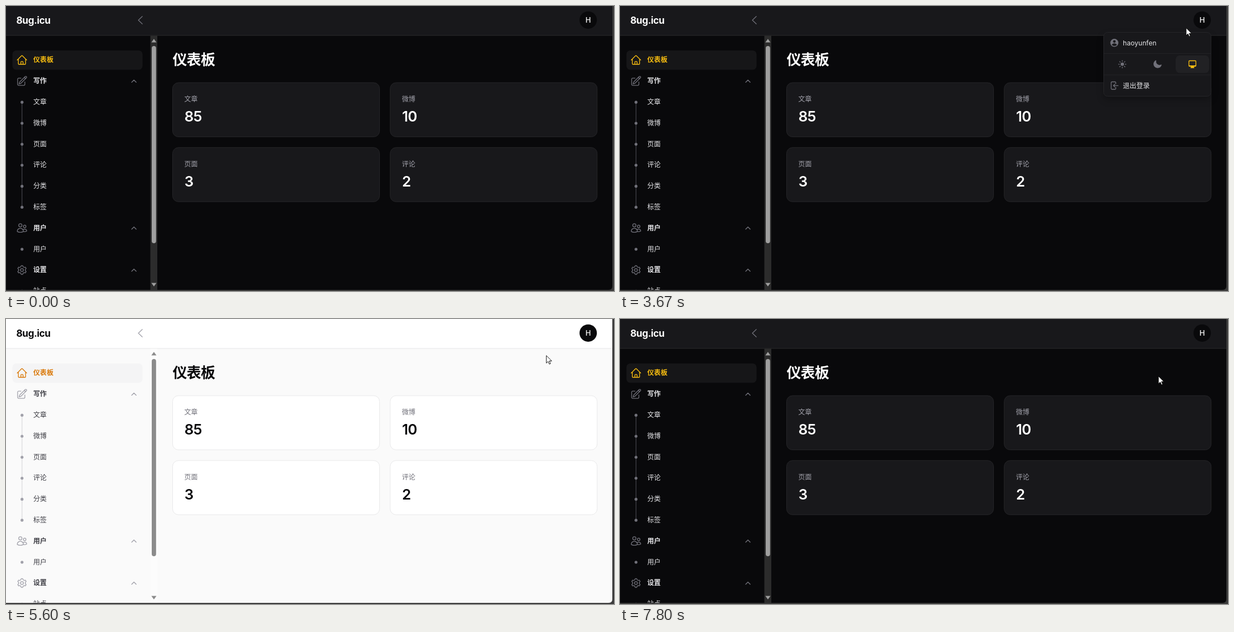
Recreate the animation shown at these times as an HTML page. Size 1093 px wide and 513 px high, loop 8 s.

```html
<!DOCTYPE html>
<html lang="zh-CN">
<head>
<meta charset="utf-8">
<title>仪表板</title>
<style>
html, body { margin: 0; width: 100%; height: 100%; overflow: hidden; background: #3b3b3b; }
svg { display: block; width: 1093px; height: 513px; font: 12.1px Inter, "Noto Sans CJK SC", sans-serif; }
#app {
  --page: #09090b; --panel: #18181b; --line: #2a2a2c; --ring: #252528; --rule: #232326;
  --strong: #fff; --text: #e4e4e7; --label: #a1a1aa; --icon: #71717a; --hover-icon: #a1a1aa;
  --thread: #52525b; --active: #161618; --accent: #fbbf10; --theme-accent: #fbbf10;
  --track: #2c2c2c; --thumb: #9f9f9f; --pick: #212124; --tip: #333; --tip-text: #fff;
  --old-icon: var(--icon); --shadow: rgba(0,0,0,.25); --tip-shadow: transparent;
}
#app.light {
  --page: #fafafa; --panel: #fff; --line: #e6e6e8; --ring: #e9e9ea; --rule: #f2f2f3;
  --strong: #09090b; --text: #3f3f46; --label: #71717a; --icon: #a1a1aa; --hover-icon: #71717a;
  --thread: #d4d4d8; --active: #f4f4f5; --accent: #d97706; --theme-accent: #e8a008;
  --track: #fcfcfc; --thumb: #8b8b8b; --pick: #fafafa; --tip: #fff; --tip-text: #26323d;
  --shadow: rgba(0,0,0,.16); --tip-shadow: rgba(120,128,145,.25);
}
#menu.fade {
  --panel: #757575; --rule: #2a2a2c; --ring: #666; --text: #b5b5b5; --icon: #8e8e92;
  --pick: #1f1f21; --old-icon: #b8924c;
}
.light #menu.fade {
  --panel: #969696; --rule: #ececec; --ring: #969696; --text: #5e5e5e; --icon: #a9a9b0;
  --pick: #f3f3f3; --theme-accent: #e8a63a; --old-icon: #d0b184;
}
text { fill: var(--text); white-space: pre; }
.strong { fill: var(--strong); }
.label { fill: var(--label); }
.line { fill: none; stroke: var(--icon); stroke-linecap: round; stroke-linejoin: round; }
.solid { fill: var(--icon); }
.panel { fill: var(--panel); stroke: var(--ring); }
#menu > .panel { filter: drop-shadow(0 6px 6px var(--shadow)); }
.choice { color: var(--icon); --bg: transparent; }
.choice.hover { color: var(--hover-icon); --bg: var(--pick); }
.choice.old { color: var(--old-icon); }
.choice.on { color: var(--theme-accent); --bg: var(--pick); }
#tip > g { fill: var(--tip); filter: drop-shadow(0 0 8px var(--tip-shadow)); }
#tip text { fill: var(--tip-text); }
.cursor { fill: #fff; stroke: #000; stroke-linejoin: round; }
</style>
</head>
<body>
<svg viewBox="0 0 1093 513">
  <clipPath id="edge"><path d="M0 0H1090V504Q1090 511 1083 511H0Z"/></clipPath>
  <g id="app"></g>
</svg>
<script>
const $ = id => document.getElementById(id);
const app = $('app');

// Text is placed by its left edge and the middle of its line.
const text = (x, mid, s, size = 12.1, attrs = '') =>
  `<text x="${x}" y="${mid + size * .37}" font-size="${size}" ${attrs}>${s}</text>`;
const rect = (x, y, w, h, r, attrs) =>
  `<rect x="${x}" y="${y}" width="${w}" height="${h}" rx="${r}" ${attrs}/>`;
const path = (d, attrs = 'class="line"') => `<path d="${d}" ${attrs}/>`;

function cog() {
  const at = (r, deg) => {
    const a = deg * Math.PI / 180;
    return `${(12 + r * Math.sin(a)).toFixed(2)} ${(12 - r * Math.cos(a)).toFixed(2)}`;
  };
  let pts = [];
  for (let a = 0; a < 360; a += 60)
    pts.push(at(7, a - 20), at(9.2, a - 10), at(9.2, a + 10), at(7, a + 20));
  return `M${pts.join('L')}ZM15 12a3 3 0 1 1-6 0a3 3 0 0 1 6 0Z`;
}

const icons = {
  home: 'm2.25 12 8.954-8.955c.44-.439 1.152-.439 1.591 0L21.75 12M4.5 9.75v10.125c0 .621.504 1.125 1.125 1.125H9.75v-4.875c0-.621.504-1.125 1.125-1.125h2.25c.621 0 1.125.504 1.125 1.125V21h4.125c.621 0 1.125-.504 1.125-1.125V9.75M8.25 21h8.25',
  write: 'm16.862 4.487 1.687-1.688a1.875 1.875 0 1 1 2.652 2.652L10.582 16.07a4.5 4.5 0 0 1-1.897 1.13L6 18l.8-2.685a4.5 4.5 0 0 1 1.13-1.897l8.932-8.931Zm0 0L19.5 7.125M18 14v4.75A2.25 2.25 0 0 1 15.75 21H5.25A2.25 2.25 0 0 1 3 18.75V8.25A2.25 2.25 0 0 1 5.25 6H10',
  users: 'M15 19.128a9.38 9.38 0 0 0 2.625.372 9.337 9.337 0 0 0 4.121-.952 4.125 4.125 0 0 0-7.533-2.493M15 19.128v-.003c0-1.113-.285-2.16-.786-3.07M15 19.128v.106A12.318 12.318 0 0 1 8.624 21c-2.331 0-4.512-.645-6.374-1.766l-.001-.109a6.375 6.375 0 0 1 11.964-3.07M12 6.375a3.375 3.375 0 1 1-6.75 0 3.375 3.375 0 0 1 6.75 0Zm8.25 2.25a2.625 2.625 0 1 1-5.25 0 2.625 2.625 0 0 1 5.25 0Z',
  cog: cog(),
  moon: 'M7.455 2.004a.75.75 0 0 1 .26.77 7 7 0 0 0 9.958 7.967.75.75 0 0 1 1.067.853A8.5 8.5 0 1 1 6.647 1.921a.75.75 0 0 1 .808.083Z',
  screen: 'M2 4.25A2.25 2.25 0 0 1 4.25 2h11.5A2.25 2.25 0 0 1 18 4.25v8.5A2.25 2.25 0 0 1 15.75 15h-3.105a3.5 3.5 0 0 0 1.1 1.677A.75.75 0 0 1 13.26 18H6.74a.75.75 0 0 1-.484-1.323A3.5 3.5 0 0 0 7.355 15H4.25A2.25 2.25 0 0 1 2 12.75ZM3.5 4.25a.75.75 0 0 1 .75-.75h11.5a.75.75 0 0 1 .75.75v7.5a.75.75 0 0 1-.75.75H4.25a.75.75 0 0 1-.75-.75Z'
};

const nav = [
  ['仪表板', 'home'], ['写作', 'write'], ['文章'], ['微博'], ['页面'], ['评论'],
  ['分类'], ['标签'], ['用户', 'users'], ['用户'], ['设置', 'cog'], ['站点']
];

function navItem([name, icon], i) {
  const y = 97 + 37.8 * i;
  if (!icon)
    return `<circle cx="28.8" cy="${y + .6}" r="2.6" class="solid"/>` + text(49, y, name);
  const color = i ? '' : 'style="stroke:var(--accent)"';
  return path(icons[icon], `class="line" stroke-width="1.5" ${color} transform="translate(18.3 ${y - 10.2}) scale(.867)"`) +
    text(49, y, name, 12.1, `font-weight="700" ${i ? '' : 'style="fill:var(--accent)"'}`) +
    (i ? path(`M226 ${y + 2.4}l4-4 4 4`, 'class="line" stroke-width="1.4"') : '');
}

function card(name, count, i) {
  const x = 299.5 + i % 2 * 391.2, y = 138 + (i >> 1) * 116.8;
  return rect(x, y, 372, 97.5, 10.5, 'class="panel"') +
    text(x + 21, y + 29.5, name, 12.1, 'class="label"') +
    text(x + 21.3, y + 60.4, count, 26, 'class="strong" font-weight="600" letter-spacing="-.65"');
}

function choice(i, art) {
  const x = 873 + 63 * i;
  return `<g class="choice" fill="currentColor">${rect(x, 89, 60, 31.5, 7, 'style="fill:var(--bg)"')}
    <g transform="translate(${x + 30} 104.8) scale(.867)">${art}</g></g>`;
}

const rays = [...Array(8)].map((_, i) =>
  `<path d="M0-6v-1.7" stroke="currentColor" stroke-width="1.5" stroke-linecap="round" transform="rotate(${i * 45})"/>`).join('');

const page = `
  <rect width="1090" height="511" style="fill:var(--page)"/>
  <rect width="1090" height="53" style="fill:var(--panel)"/>
  <rect y="52.5" width="1090" height="1" style="fill:var(--line)"/>
  ${text(18.5, 25.5, '8ug.icu', 17.3, 'class="strong" font-weight="700" letter-spacing="-.43"')}
  ${path('M245 18.8l-7 6.7 7 6.7', 'class="line" stroke-width="1.3"')}
  <circle cx="1046.6" cy="25.3" r="15.6" fill="#09090b"/>
  ${text(1046.6, 25.3, 'H', 13, 'text-anchor="middle" style="fill:#fff" font-weight="500"')}
  ${rect(11.5, 80, 234, 34.7, 7, 'style="fill:var(--active)"')}
  <path d="M28.8 173V362" style="stroke:var(--thread)"/>
  ${nav.map(navItem).join('')}
  ${rect(259.5, 53.5, 12.5, 458, 0, 'style="fill:var(--track)"')}
  <g style="fill:var(--thumb)">${rect(262, 72, 7.8, 355, 3.9, '')}
    <path d="M261.3 65.5l4.6-6.2 4.6 6.2ZM261.3 498.5l4.6 6.2 4.6-6.2Z"/></g>
  ${text(299.5, 96.3, '仪表板', 26, 'class="strong" font-weight="700" letter-spacing="-.65"')}
  ${[['文章', 85], ['微博', 10], ['页面', 3], ['评论', 2]].map(([n, c], i) => card(n, c, i)).join('')}`;

const menu = `<g id="menu">
  ${rect(869.5, 47.5, 193, 115, 7, 'class="panel"')}
  <path d="M870 85.5H1062M870 124H1062" style="stroke:var(--rule)"/>
  <circle cx="888.7" cy="66.3" r="7.2" class="solid"/>
  <path d="M884 69.8a5.6 5.6 0 0 1 9.4 0a6 6 0 0 1-9.4 0Z" style="fill:var(--panel)"/>
  <circle cx="888.7" cy="63.8" r="2.4" style="fill:var(--panel)"/>
  ${text(904, 66.2, 'haoyunfen')}
  ${choice(0, '<circle r="3.5"/>' + rays)}
  ${choice(1, path(icons.moon, 'transform="translate(-10 -10)"'))}
  ${choice(2, path(icons.screen, 'fill-rule="evenodd" transform="translate(-10 -10)"'))}
  ${path('M891.3 140v-2a1.5 1.5 0 0 0-1.5-1.5H884.500a1.5 1.5 0 0 0-1.500 1.500v10.500a1.500 1.500 0 0 0 1.500 1.500h5.300a1.500 1.500 0 0 0 1.500-1.500v-2M895.500 143.300H887m2.500-2.500l-2.500 2.500 2.500 2.500', 'class="line" stroke-width="1.3"')}
  ${text(904, 143.2, '退出登录')}
</g>`;

const tip = `<g id="tip">
  <g>${rect(-50, 55, 100, 25.5, 3.5, '')}<path d="M-7 80H7L0 87Z"/></g>
  <text id="hint" y="72.300" font-size="12" text-anchor="middle"></text>
</g>`;

const pointers = `
  ${path('M0 0V13.5L3.2 10.6 5.4 15.4 7.5 14.5 5.4 9.8H9.8Z', 'id="arrow" class="cursor" stroke-width=".9"')}
  ${path('M-1.6 1.500Q0-1 1.600 1.500V6.500Q2.200 5.600 3.600 6T4.500 7.200Q5.500 6.500 6.600 7.200T7.200 8.400Q8.900 7.800 9 9.600V13Q9 15 7.600 16.500V18.500H-.5V17Q-3 14.500-4.600 11.400-5.400 10-4.200 9.300-3 8.900-1.600 11Z', 'id="hand" class="cursor"')}`;

app.innerHTML = `<g clip-path="url(#edge)">${page}${menu}${tip}${pointers}</g>`;
const choices = [...document.querySelectorAll('.choice')];

// Keys are [tick, ...values]; there are 15 ticks per second.
const moves = [
  [4, 1082, 494], [13, 410, 149], [28, 410, 149], [38, 1042, 20], [39, 1042, 20],
  [41, 1047, 22], [53, 1047, 22], [61, 907, 106], [80, 907, 106], [89, 1056, 13],
  [92, 1048, 21], [99, 1048, 21], [106, 968, 103]
];
const menuKeys = [[44, 0], [47, 1], [70, 1], [71, .4], [72, 0], [95, 0], [98, 1], [115, 1], [116, .4], [117, 0]];
const tipKeys = [[61, 0], [64, 1], [67, 1], [68, .8], [69, .45], [70, .12], [71, 0],
  [106, 0], [109, 1], [112, 1], [113, .8], [114, .45], [115, .12], [116, 0]];

const linear = p => p;
const glide = p => .6 * p + .2 * (1 - Math.cos(Math.PI * p));

function track(keys, n, ease) {
  const i = keys.findIndex(k => k[0] > n);
  if (i < 0) return keys[keys.length - 1].slice(1);
  if (i === 0) return keys[0].slice(1);
  const a = keys[i - 1], b = keys[i], p = ease((n - a[0]) / (b[0] - a[0]));
  return a.slice(1).map((v, j) => v + (b[j + 1] - v) * p);
}

function draw(ms) {
  const n = Math.floor((ms + 4) * 15 / 1000) % 120;
  const light = n >= 70 && n < 115;
  const [x, y] = track(moves, n, glide);
  const [open] = track(menuKeys, n, linear);
  const [hint] = track(tipKeys, n, linear);

  app.classList.toggle('light', light);
  $('menu').classList.toggle('fade', n === 70 || n === 115);
  $('menu').style.opacity = open;
  $('menu').style.display = open ? '' : 'none';

  const picked = n < 70 ? 2 : light ? 0 : 1;
  const over = open && y > 89 && y < 121 ? Math.floor((x - 873) / 63) : -1;
  choices.forEach((c, i) => {
    c.classList.toggle('on', i === picked);
    c.classList.toggle('hover', i === over);
    c.classList.toggle('old', n === 70 && i === 2 || n === 115 && i === 0);
  });

  $('tip').style.opacity = hint;
  $('tip').setAttribute('transform', `translate(${n < 80 ? 903 : 966} 0)`);
  $('hint').textContent = n < 80 ? '切换至浅色主题' : '切换至深色主题';

  const hand = Math.hypot(x - 1046.6, y - 25.3) < 15.6 || over >= 0;
  for (const [id, on] of [['arrow', !hand], ['hand', hand]]) {
    $(id).setAttribute('transform', `translate(${x} ${y})`);
    $(id).style.display = on && n >= 4 ? '' : 'none';
  }
}

const start = performance.now();
function tick() {
  draw((performance.now() - start) % 8000);
  requestAnimationFrame(tick);
}
tick();
</script>
</body>
</html>
```
